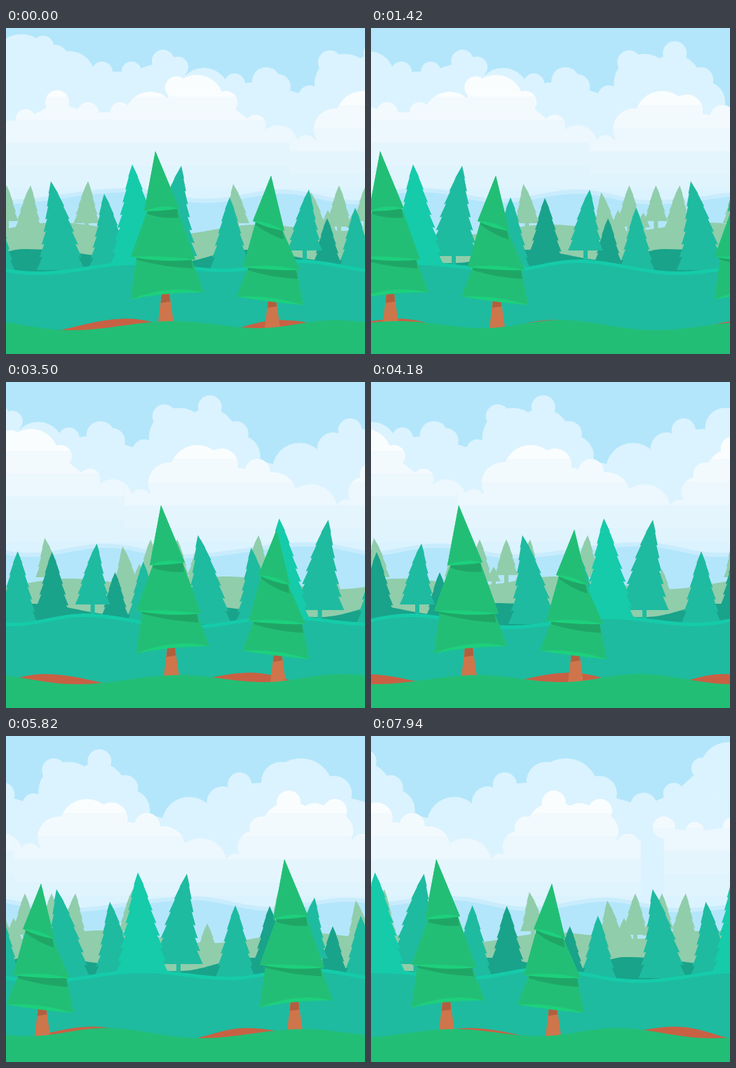
These frames come from a looping animation (512x466 px, 8000 ms). An HTML page with a canvas:

```html
<!DOCTYPE html>
<html lang="en">
<head>
<meta charset="utf-8">
<title>Forest</title>
<style>
  html, body { margin: 0; width: 100%; height: 100%; overflow: hidden; background: #b3e6fb; }
  canvas { display: block; width: 100vw; height: 100vh; }
</style>
</head>
<body>
<canvas id="stage" width="512" height="466"></canvas>
<script>
const W = 512, H = 466, LOOP = 8000, SKY_WIDTH = 1024, HORIZON = 236;
const ctx = document.getElementById('stage').getContext('2d');

const SKY = '#b3e6fb', CLOUD = '#dbf3fe', HAZE = '#c9ecfd', PALE = '#90cdab',
      DARK = '#19a38a', TEAL = '#1ebba0', MINT = '#15cbaa',
      GREEN = '#23be76', LIME = '#1dd07c', SHADE = '#1fa667',
      BARK = '#cf754c', BARK_SHADE = '#b05f3f', SOIL = '#c86144';

// Pixels moved per tick by each layer
const SPEED = { cloud: 3.75, hills: 4, far: 64 / 15, mid: 4.8, soil: 16 / 3, front: 8 };
const tickAt = t => Math.max(0, Math.floor((t - 18) / 55.2));

// Main puffs from left to right: centre x, centre y, radius
const BACK_PUFFS = [
  [22, 50, 41], [53, 26, 15], [70, 42, 18], [90, 70, 37], [137, 63, 15], [179, 62, 14],
  [224, 47, 16], [245, 56, 15], [282, 94, 37], [326, 80, 15], [371, 76, 20], [388, 84, 18],
  [433, 98, 16], [462, 49, 17], [483, 80, 43], [527, 36, 17], [525, 78, 40], [564, 74, 18],
  [569, 106, 30], [655, 126, 39], [703, 95, 23], [727, 69, 17], [786, 65, 28], [814, 79, 47],
  [862, 82, 25], [925, 100, 19], [968, 82, 15], [1008, 46, 15]
];
const WHITE_PUFFS = [
  [-70, 131, 16], [-26, 136, 13], [28, 130, 14], [73, 106, 17], [117, 121, 15], [163, 120, 14],
  [206, 128, 37], [243, 85, 16], [272, 106, 39], [314, 106, 16], [356, 139, 15], [388, 168, 29],
  [428, 167, 14], [469, 145, 30], [509, 129, 39], [544, 118, 23], [595, 128, 18], [618, 161, 32],
  [671, 184, 38], [721, 182, 14], [746, 158, 22], [758, 132, 17], [797, 95, 17], [799, 136, 42],
  [834, 122, 26], [863, 107, 17], [862, 136, 27], [903, 158, 18]
];

// Troughs and crests of each wave over one period: x, y
const HILL_WAVE = [[175, 229], [285, 244], [395, 231], [500, 246]];
const FAR_WAVE = [[70, 278], [230, 296], [360, 281], [475, 290]];
const DARK_WAVE = [[25, 316], [238, 336], [342, 317], [465, 333]];
const MID_WAVE = [[45, 349], [186, 335], [312, 345], [415, 332]];
const SOIL_WAVE = [[25, 438], [173, 415.5], [285, 437], [390, 417.5]];
const GROUND_WAVE = [[92, 432], [240, 419], [360, 429], [470, 417.5]];

// Firs: apex x, apex y, lean of the base, base y
const FAR_FIRS = [
  [1, 225, 0, 276], [35, 225, -3, 287], [117, 219, -2, 279], [223, 268, 0, 300], [324, 223, 5, 279],
  [435, 235, 5, 293], [459, 260, 0, 292], [475, 225, 0, 284], [495, 264, 0, 285]
];
const DARK_FIRS = [[368, 243, 1, 335], [458, 272, 0, 335]];
const TEAL_FIRS = [
  [140, 237, 7, 345], [64, 219, 14, 346], [250, 197, -12, 326], [319, 242, 0, 346],
  [432, 231, -6, 318], [498, 257, 1, 347]
];
const MINT_FIRS = [[180, 195, 6, 340]];

// Rims from the top down: left x, y, right x, y, bend
const FRONT_TREES = [
  { apex: [213, 176], trunk: 228, base: 421,
    rims: [[197, 262, 247, 258, 2], [178, 327, 270, 331, 7], [178, 388, 282, 378, -6]] },
  { apex: [378, 211], trunk: 380, base: 429,
    rims: [[352, 276, 397, 290, 4], [338, 342, 419, 346, 3], [329, 384, 424, 396, 2]] }
];

const mix = (a, b, u) => a + (b - a) * u;

// Eases like a half cosine from each key point to the next
function waveHeight(keys, x) {
  x = ((x - keys[0][0]) % W + W) % W + keys[0][0];
  const i = keys.findLastIndex(key => key[0] <= x);
  const [ax, ay] = keys[i];
  const [bx, by] = keys[i + 1] || [keys[0][0] + W, keys[0][1]];
  return mix(ay, by, (1 - Math.cos(Math.PI * (x - ax) / (bx - ax))) / 2);
}

function wave(keys, shift, color, drop = 0) {
  ctx.fillStyle = color;
  ctx.beginPath();
  ctx.moveTo(0, H);
  for (let x = 0; x <= W; x += 4) ctx.lineTo(x, waveHeight(keys, x + shift) + drop);
  ctx.lineTo(W, H);
  ctx.fill();
}

function tile(shift, period, draw) {
  for (let x = -(shift % period) - period; x < W + period; x += period) {
    ctx.save();
    ctx.translate(x, 0);
    draw();
    ctx.restore();
  }
}

function polygon(color, points) {
  ctx.fillStyle = color;
  ctx.beginPath();
  points.forEach(([x, y]) => ctx.lineTo(x, y));
  ctx.fill();
}

// Round puffs over a body that joins their centres
function cloud(list, color) {
  const [x, y, r] = list[0];
  const all = [...list, [x + SKY_WIDTH, y, r]];
  polygon(color, [[x, HORIZON], ...all, [x + SKY_WIDTH, HORIZON]]);
  for (const [cx, cy, radius] of all) {
    ctx.beginPath();
    ctx.arc(cx, cy, radius, 0, 2 * Math.PI);
    ctx.fill();
  }
}

// Hard-edged bands that fade from white to the cloud colour
function bands(first) {
  const fill = ctx.createLinearGradient(0, first - 33, 0, first + 132);
  ['#fafdfe', '#f3fafe', '#ecf7fe', '#e5f5fe', '#e0f4fe'].forEach((color, i) => {
    fill.addColorStop(i / 5, color);
    fill.addColorStop((i + 1) / 5, color);
  });
  fill.addColorStop(1, CLOUD);
  return fill;
}
const HIGH_FILL = bands(98), LOW_FILL = bands(110);

function whiteBank(x, width, fill) {
  ctx.save();
  ctx.beginPath();
  ctx.rect(x, 0, width, HORIZON);
  ctx.clip();
  cloud(WHITE_PUFFS, fill);
  ctx.restore();
}

function clouds() {
  cloud(BACK_PUFFS, CLOUD);
  whiteBank(-103, 508, HIGH_FILL);
  whiteBank(405, 516, LOW_FILL);
}

// The axis bends from the apex towards the base while the tiers widen
function fir([x, y, lean, base], color) {
  const height = base - y, tiers = Math.round(height / 24) + 2;
  const half = 5 + 0.23 * height;
  const left = [], right = [];
  for (let i = 1; i <= tiers; i++) {
    const u = i / tiers, axis = x + lean * (1 - (1 - u) ** 2), reach = half * u ** 0.8;
    for (const [scale, lift] of i < tiers ? [[1, 0], [0.85, 1]] : [[1, 0]]) {
      left.unshift([axis - reach * scale, y + height * u - lift]);
      right.push([axis + reach * scale, y + height * u - lift]);
    }
  }
  polygon(color, [[x, y], ...right, ...left]);
  ctx.fillRect(x + lean - 3, base - 1, 6, 17);
}

function firs(list, color) {
  list.forEach(item => fir(item, color));
}

function tier([[ax, ay], [bx, by]], [lx, ly, rx, ry, bend]) {
  for (const [color, sag] of [[LIME, bend], [GREEN, bend - 11]]) {
    ctx.fillStyle = color;
    ctx.beginPath();
    ctx.moveTo(ax, ay);
    ctx.lineTo(bx, by);
    ctx.lineTo(rx, ry);
    ctx.quadraticCurveTo((lx + rx) / 2, (ly + ry) / 2 + sag, lx, ly);
    ctx.fill();
  }
}

// Shadow that a rim casts on the tier below it
function shadow([[ax, ay], [bx, by]]) {
  ctx.fillStyle = SHADE;
  ctx.beginPath();
  ctx.moveTo(ax, ay);
  ctx.lineTo(bx, by);
  ctx.lineTo(bx + 2, by + 13);
  ctx.quadraticCurveTo((ax + bx) / 2, (ay + by) / 2 + 13, ax, ay + 4);
  ctx.fill();
}

function frontTree({ apex, trunk, base, rims }) {
  const [lx, ly, rx, ry] = rims[2], top = (ly + ry) / 2 - 4;
  polygon(BARK, [[trunk - 6, top], [trunk + 5, top], [trunk + 11, base], [trunk - 11, base]]);
  polygon(BARK_SHADE, [[trunk - 6, top], [trunk + 5, top], [trunk + 6, top + 12], [trunk - 7, top + 14]]);
  for (let i = 2; i >= 0; i--) {
    if (i === 0) {
      tier([apex, apex], rims[0]);
      continue;
    }
    const [ax, ay, bx, by] = rims[i - 1];
    const neck = [0.09, 0.94].map(u => [mix(ax, bx, u), mix(ay, by, u)]);
    tier(neck, rims[i]);
    shadow(neck);
  }
}

function render(t) {
  const tick = tickAt(t);
  const shift = {};
  for (const layer in SPEED) shift[layer] = tick * SPEED[layer];

  ctx.fillStyle = SKY;
  ctx.fillRect(0, 0, W, H);
  tile(shift.cloud, SKY_WIDTH, clouds);
  ctx.fillStyle = CLOUD;
  ctx.fillRect(0, 229, W, 24);
  wave(HILL_WAVE, shift.hills, HAZE);
  wave(HILL_WAVE, shift.hills, SKY, 6);
  tile(shift.far, W, () => firs(FAR_FIRS, PALE));
  wave(FAR_WAVE, shift.far, PALE);
  wave(DARK_WAVE, shift.mid, DARK);
  tile(shift.mid, W, () => {
    firs(DARK_FIRS, DARK);
    firs(TEAL_FIRS, TEAL);
    firs(MINT_FIRS, MINT);
  });
  wave(MID_WAVE, shift.mid, MINT, -1);
  wave(MID_WAVE, shift.mid, TEAL, 4);
  wave(SOIL_WAVE, shift.soil, SOIL);
  tile(shift.front, W, () => FRONT_TREES.forEach(frontTree));
  wave(GROUND_WAVE, shift.front, GREEN);
}

const begin = performance.now();
function frame() {
  render((performance.now() - begin) % LOOP);
  requestAnimationFrame(frame);
}
frame();
</script>
</body>
</html>
```
